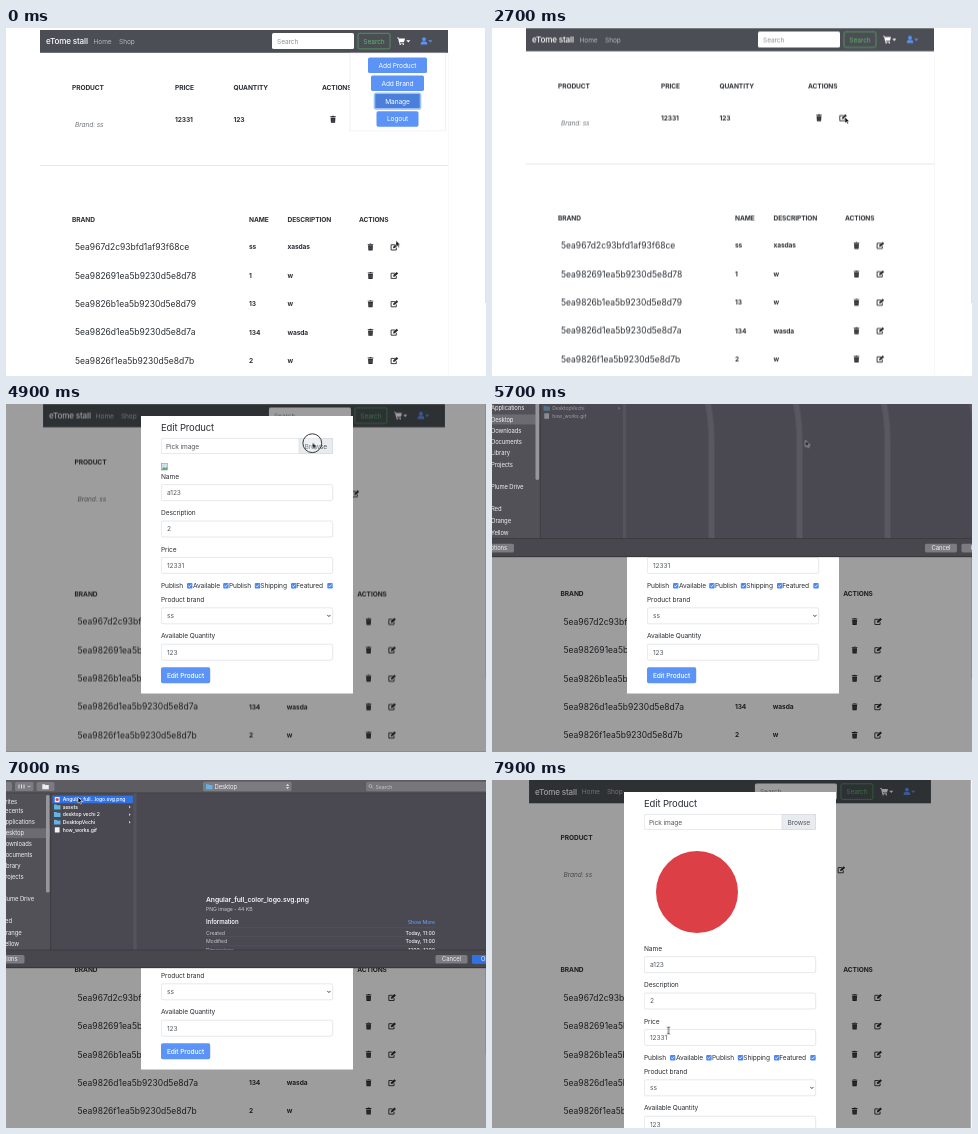
Recreate the animation shown at these times as an HTML page. Size 480 px wide and 348 px high, loop 8000 ms.

```html
<!DOCTYPE html>
<html lang="en">
<head>
<meta charset="utf-8">
<title>Book store admin</title>
<style>
html, body { margin: 0; width: 100%; height: 100%; overflow: hidden; background: #fff; }
svg { display: block; width: 480px; height: 348px; }
text { font: 400 6.6px Inter, "Open Sans", sans-serif; letter-spacing: -.015em; fill: #2b2f34; white-space: pre; }
.b { font-weight: 700; }
.m { font-weight: 500; }
.id { font-size: 8.5px; letter-spacing: 0; }
.h { font-size: 9.5px; }
.brand { font-size: 8.1px; font-weight: 500; letter-spacing: -.02em; fill: #fff; }
.nav { fill: #b4b7ba; }
.hint { fill: #8a9097; }
.val { fill: #50565d; }
.it { font-style: italic; fill: #71777d; }
.w { fill: #fff; }
.mid { text-anchor: middle; }
.end { text-anchor: end; }
.side { font-size: 5.9px; fill: #f0eff3; }
.file { font-size: 5.05px; font-weight: 500; fill: #fff; }
.info { font-size: 5.2px; fill: #c9c8ce; }
.value { fill: #f0eff3; font-weight: 500; }
.link { fill: #5b9bf8; font-weight: 500; }
.f7 { font-size: 6.8px; font-weight: 600; fill: #f6f5f9; }
.f6 { font-size: 6px; font-weight: 600; fill: #f6f5f9; }
#narrow .rule { display: none; }

/* every track lasts one 8 s loop: 1% = 80 ms */
#scroll, #menu, #wide, #narrow, #dim, #modal, #shift, #rest, #photo, #broken, #sheet,
#files, #stripes, #pick, #open, #mouse, #arrow, #beam, #ring { animation: 8s linear infinite; }
#wide, #narrow, #menu, #shift, #rest, #photo, #broken, #files, #stripes, #pick, #open,
#arrow, #beam, #ring { animation-timing-function: step-end; }

#scroll { animation-name: scroll; }
@keyframes scroll { 0%, 1.25% { transform: translateY(1.5px); animation-timing-function: ease-out; } 6%, 100% { transform: none; } }
#menu { animation-name: menu; }
@keyframes menu { 0% { opacity: 1; } 24%, 100% { opacity: 0; } }
#wide { animation-name: before; }
@keyframes before { 0% { opacity: 1; } 35%, 100% { opacity: 0; } }
#narrow { animation-name: after; }
@keyframes after { 0% { opacity: 0; } 35%, 100% { opacity: 1; } }
#dim { animation-name: dim; }
@keyframes dim { 0%, 34.5% { opacity: 0; } 37.5%, 100% { opacity: .385; } }
#modal { animation-name: modal; }
@keyframes modal {
  0%, 35% { opacity: 0; transform: translateY(-21px); animation-timing-function: ease-out; }
  39%, 100% { opacity: 1; transform: none; }
}
#shift { animation-name: shift; }
@keyframes shift { 0% { transform: none; } 97.5%, 100% { transform: translateX(-3px); } }
#rest { animation-name: rest; }
@keyframes rest { 0% { transform: none; } 97.5%, 100% { transform: translateY(96px); } }
#photo { animation-name: photo; }
@keyframes photo { 0% { opacity: 0; } 97.5%, 100% { opacity: 1; } }
#broken { animation-name: broken; }
@keyframes broken { 0% { opacity: 1; } 97.5%, 100% { opacity: 0; } }
#sheet { animation-name: sheet; }
@keyframes sheet {
  0%, 66.8% { transform: translate(3.5px, -200px) scale(1, 1.02); }
  71.25% { transform: translate(3.5px, -39px) scale(1, 1.02); animation-timing-function: ease-out; }
  75%, 91.5% { transform: translate(0, 0) scale(1, 1); animation-timing-function: ease-in; }
  96%, 100% { transform: translate(0, -200px) scale(1, 1); }
}
#files { animation-name: files; }
@keyframes files { 0% { opacity: .4; } 75%, 100% { opacity: 1; } }
#stripes { animation-name: stripes; }
@keyframes stripes { 0% { opacity: 1; } 76%, 100% { opacity: 0; } }
#pick, #open { animation-name: pick; }
@keyframes pick { 0% { opacity: 0; } 86.25%, 100% { opacity: 1; } }
#mouse { animation-name: mouse; }
@keyframes mouse {
  0%, 1.25% { transform: translate(390px, 212.5px); }
  11.25% { transform: translate(384px, 84px); }
  12.5% { transform: translate(410px, 38px); }
  13.75%, 15% { transform: translate(404px, 63px); }
  17.4%, 21.25% { transform: translate(392px, 149.5px); }
  31.25%, 43.75% { transform: translate(353px, 89px); }
  53.75% { transform: translate(312px, 58px); }
  56.25%, 67.5% { transform: translate(306.5px, 38.5px); }
  70%, 71.5% { transform: translate(313.5px, 36.5px); }
  77.5%, 78.75% { transform: translate(115px, 45px); }
  83.75%, 91.25% { transform: translate(72px, 17px); }
  97%, 100% { transform: translate(176.5px, 247px); }
}
#arrow { animation-name: arrow; }
@keyframes arrow { 0% { opacity: 1; } 96.25%, 100% { opacity: 0; } }
#beam { animation-name: beam; }
@keyframes beam { 0% { opacity: 0; } 96.25%, 100% { opacity: 1; } }
#ring { animation-name: ring; }
@keyframes ring { 0% { opacity: 0; } 58.75% { opacity: 1; } 63.75%, 100% { opacity: 0; } }
</style>
</head>
<body>
<svg id="stage" viewBox="0 0 480 348" xmlns="http://www.w3.org/2000/svg"></svg>
<script>
const BLUE = '#5b93f7', LINE = '#d3d7dc', RED = '#dc3f45', BAR = '#48474d', KEY = '#7c7b81';
const rect = (x, y, w, h, fill, extra = '') =>
  `<rect x="${x}" y="${y}" width="${w}" height="${h}" fill="${fill}" ${extra}/>`;
const text = (x, y, s, cls = '') => `<text x="${x}" y="${y}" class="${cls}">${s}</text>`;
const path = (d, fill, extra = '') => `<path d="${d}" fill="${fill}" ${extra}/>`;
const line = (d, color, width) => path(d, 'none', `stroke="${color}" stroke-width="${width}"`);
const disc = (x, y, r, fill) => `<circle cx="${x}" cy="${y}" r="${r}" fill="${fill}"/>`;
const at = (x, y, s) => `<g transform="translate(${x} ${y})">${s}</g>`;
const group = (id, ...s) => `<g id="${id}">${s.join('')}</g>`;
const range = (list, fn) => list.map(fn).join('');

// icons, centred on 0,0
const trash = (x, y) => at(x, y,
  path('M-2.8 -3H-1L-.6 -3.5H.6L1 -3H2.8V-2.2H-2.8ZM-2.4 -1.7H2.4L2.1 3.5H-2.1Z', '#25292d') +
  line('M-1 -.8V2.6M0 -.8V2.6M1 -.8V2.6', '#777', .35));
const edit = (x, y) => at(x, y,
  line('M.6 -2.2H-3.2V3H2V.6', '#25292d', .9) +
  path('M-1.2 1.3L-.9 -.4L2.3 -3.5L3.9 -2L.6 1Z', '#25292d'));
const caret = (x, y, fill) => path(`M${x} ${y}h4l-2 2.2z`, fill);
const cart = (x, y) => at(x, y,
  path('M-4 -3.5H-2.4L-2.1 -2.5H4L3.1 1H-1.2L-1 1.7H2.9V2.4H-1.7L-2.9 -2.8H-4Z', '#fff') +
  disc(-.8, 3.2, .8, '#fff') + disc(2.3, 3.2, .8, '#fff'));
const user = (x, y) => at(x, y,
  disc(0, -1.8, 1.9, BLUE) + path('M-3.2 3.5V2Q-3 .4 -1.4 .4H1.4Q3 .4 3.2 2V3.5Z', BLUE));

const brands = [
  ['5ea967d2c93bfd1af93f68ce', 'ss', 'xasdas'],
  ['5ea982691ea5b9230d5e8d78', '1', 'w'],
  ['5ea9826b1ea5b9230d5e8d79', '13', 'w'],
  ['5ea9826d1ea5b9230d5e8d7a', '134', 'wasda'],
  ['5ea9826f1ea5b9230d5e8d7b', '2', 'w'],
];

// k narrows the layout around its middle without scaling the type
function page(k) {
  const X = x => +(238 + (x - 238) * k).toFixed(2);
  const t = (x, y, s, cls) => text(X(x), y, s, cls);
  const left = X(34), right = X(442), width = right - left;
  return [
    rect(left, 0, width, 23.3, '#4b4f55'),
    t(40, 14.7, 'eTome stall', 'brand'), t(87.5, 14.2, 'Home', 'nav'), t(113, 14.2, 'Shop', 'nav'),
    at(right - 442, 0,
      rect(266, 3.6, 82, 16, '#fff', 'rx="1.7"') + text(271, 14, 'Search', 'hint') +
      rect(352, 3.8, 32, 15.6, 'none', 'rx="1.7" stroke="#57ab62" stroke-width=".7"') +
      '<text x="368" y="14" class="mid" style="fill:#5db569">Search</text>' +
      cart(395, 11.5) + caret(400.3, 10.8, '#fff') + user(418, 11.5) + caret(422.3, 10.8, BLUE)),
    t(66, 60, 'PRODUCT', 'b'), t(169, 60, 'PRICE', 'b'), t(227.5, 60, 'QUANTITY', 'b'), t(316, 60, 'ACTIONS', 'b'),
    t(69, 97, 'Brand: ss', 'it'), t(169, 92.2, '12331', 'b'), t(227.5, 92.2, '123', 'b'),
    trash(X(327), 89.8), edit(X(351), 89.8),
    rect(left, 135.6, width, .7, '#dedede', 'class="rule"'),
    rect(right, 23, .5, 325, '#f0f0f0', 'class="rule"'),
    t(66, 192.3, 'BRAND', 'b'), t(243, 192.3, 'NAME', 'b'), t(281.5, 192.3, 'DESCRIPTION', 'b'), t(353, 192.3, 'ACTIONS', 'b'),
    range(brands, ([id, name, about], i) => {
      const y = 217.5 + 28.4 * i;
      return t(69, y + 3.2, id, 'id') + t(243, y + 2.3, name, 'b') + t(281.5, y + 2.3, about, 'b') +
        trash(X(364.5), y) + edit(X(388.3), y);
    }),
  ].join('');
}

const menu = rect(344, 23.5, 95.5, 78, '#fff', 'stroke="#ececec" stroke-width=".7"') +
  range([['Add Product', 59], ['Add Brand', 53], ['Manage', 46], ['Logout', 42]], ([s, w], i) => {
    const y = 28 + 17.9 * i, on = s === 'Manage';
    return rect(391.5 - w / 2, y, w, 15.6, on ? '#4a7fda' : BLUE,
      'rx="1.7"' + (on ? ' stroke="#9dbff8" stroke-width="1.6"' : '')) + text(391.5, y + 10.2, s, 'mid w');
  });

const field = (y, s) => rect(155.3, y, 171.4, 16, '#fff', `rx="1.7" stroke="${LINE}" stroke-width=".6"`) +
  text(161, y + 10.4, s, 'val');
const check = x => rect(x, 179, 5.4, 5.4, '#4c88ee', 'rx=".9"') + line(`M${x + 1.2} 181.8l1.1 1.1l1.9 -2.3`, '#fff', .8);

const form = [
  text(155, 74.7, 'Name'), field(80.6, 'a123'),
  text(155, 111, 'Description'), field(117, '2'),
  text(155, 147.7, 'Price'), field(153.4, '12331'),
  range([[155, 'Publish', 181], [187, 'Available', 217.2], [223, 'Publish', 248.8], [254.3, 'Shipping', 285], [290.3, 'Featured', 321.3]],
    ([x, s, box]) => text(x, 184, s) + check(box)),
  text(155, 197.7, 'Product brand'), field(203.8, 'ss'),
  line('M321.3 210.9l1.6 1.7l1.6 -1.7', '#333', .9),
  text(155, 234.3, 'Available Quantity'), field(240.2, '123'),
  rect(155, 263.2, 49.2, 16, BLUE, 'rx="1.7"'), text(179.6, 273.8, 'Edit Product', 'mid w m'),
].join('');

const modal = group('shift',
  rect(135, 12, 212, 277.5, '#fff'),
  group('photo', rect(135, 12, 212, 400, '#fff'), rect(481.8, 0, 2, 348, '#fafafa'), disc(208, 112, 41, RED)),
  text(155, 26.7, 'Edit Product', 'h'),
  rect(155.3, 34.4, 171.4, 15.2, '#fff', `rx="1.7" stroke="${LINE}" stroke-width=".6"`),
  text(160, 44.5, 'Pick image', 'val'),
  rect(293, 34.4, 33.7, 15.2, '#e9ecef', `stroke="${LINE}" stroke-width=".6"`),
  text(309.8, 44.5, 'Browse', 'mid val'),
  group('broken', rect(155.3, 59.6, 6, 6.4, '#cfe0f5', 'stroke="#8b95a3" stroke-width=".6"'),
    path('M155.6 65.7l2.2 -2.8l1.4 1.4l1.9 -1.4v2.8z', '#63a05c')),
  group('rest', form));

const folder = (x, y, fill) => path(`M${x} ${y - 2.5}h2.4l.7 .7h3.4v4.2h-6.5z`, fill);
const doc = y => rect(48.8, y - 2.6, 4.8, 5.4, '#f1f1f1', 'rx=".5"');
const key = (x, y, w, h, fill = KEY) => rect(x, y, w, h, fill, 'rx="1.6"');

const files = group('files',
  doc(19.5), disc(51.2, 19.6, 1.5, RED), text(56.7, 21.3, 'Angular_full...logo.svg.png', 'file'),
  range([[27, 'assets'], [34.6, 'desktop vechi 2'], [42.2, 'DesktopVechi']], ([y, s]) =>
    folder(48, y, '#62b4e4') + text(56.7, y + 1.8, s, 'file') + path(`M123 ${y - 1.4}l1.7 1.4l-1.7 1.4z`, '#d0cfd5')),
  doc(49.8), text(56.7, 51.6, 'how_works.gif', 'file'));

const places = [[23.7, 'Favourites', -17], [33, 'Recents'], [44.4, 'Applications'], [55.4, 'Desktop'], [66.4, 'Downloads'],
  [77.4, 'Documents'], [88.4, 'Library'], [99.4, 'Projects'], [121.4, 'Plume Drive'], [143.4, 'Red'], [155, 'Orange'], [166.2, 'Yellow']];
const details = [['Created', 'Today, 11:00'], ['Modified', 'Today, 11:00'], ['Dimensions', '1200×1200']];
const preview = group('pick',
  rect(46.5, 15.6, 80.5, 7.7, '#3271e2'),
  text(200, 122.3, 'Angular_full_color_logo.svg.png', 'f7'),
  text(200, 130.6, 'PNG image - 44 KB', 'info'),
  text(200, 144.2, 'Information', 'f6'), text(429, 143.8, 'Show More', 'info link end'),
  rect(200, 147.7, 229, .4, '#626068'),
  range(details, ([a, b], i) => {
    const y = 154.8 + 8.5 * i;
    return text(200, y, a, 'info') + text(429, y, b, 'info value end') + rect(200, y + 1.8, 229, .4, '#5c5a62');
  }));

const toolbar = [
  rect(-10, 0, 500, 13, '#5d5c61'), rect(-10, 12.6, 500, .6, '#38373d'),
  key(-6, 2, 12, 9), key(9, 2, 18.5, 9), key(30.5, 2, 18, 9),
  line('M13 4.5v4M15.5 4.5v4M18 4.5v4', '#eee', .9), line('M21.7 5.8l1.3 1.4l1.3 -1.4', '#eee', .7),
  folder(36.3, 6.8, '#eee'),
  key(197, 1.7, 88.5, 9.6), folder(200, 6.8, '#62b4e4'), text(208.5, 9, 'Desktop', 'side'),
  path('M280 5.7l1.6 -1.8l1.6 1.8zM280 7.3l1.6 1.8l1.6 -1.8z', '#f0f0f0'),
  key(360, 1.8, 130, 9.4, '#77767b'),
  '<circle cx="364.4" cy="6" r="1.5" fill="none" stroke="#ccc" stroke-width=".6"/>',
  line('M365.5 7.1l1.4 1.5', '#ccc', .6), text(369.5, 8.7, 'Search', 'info'),
].join('');

const footer = [
  rect(-10, 170, 500, 18, BAR), rect(-10, 169.7, 500, .6, '#35343a'), rect(-10, 187.3, 500, .7, '#333238'),
  key(-16, 175, 34.5, 8.6), text(11.5, 181.3, 'Options', 'side end'),
  key(429.5, 175, 32, 8.6), text(445.5, 181.4, 'Cancel', 'side mid'),
  key(466, 175, 34, 8.6),
  group('open', key(466, 175, 34, 8.6, '#3271e2')), text(475, 181.4, 'Open', 'side'),
].join('');

const sheet = [
  rect(-10, 188, 500, 1, '#000', 'opacity=".12"'),
  rect(-10, 0, 500, 188, '#4a4850'),
  rect(-10, 13, 55, 157, '#525158'),
  rect(-10, 48.3, 54, 9.8, '#6c6b72'),
  range(places, ([y, s, x = -4.5]) => text(x, y, s, 'side')),
  rect(44.3, 13, .8, 157, '#38373d'),
  key(40, 15, 3.6, 97.5, '#97969b'),
  group('stripes', range([1, 2, 3, 4], i => {
    const x = 128 + 88 * i;
    return line(`M${x - 12} 12Q${x} 36 ${x} 76V170`, '#59575f', 6);
  })),
  rect(127.3, 13, 3.4, 157, '#55535b'),
  preview, files, footer, toolbar,
].join('');

const mouse = group('arrow', path('M0 0V6.2L1.5 4.9L2.5 7.1L3.5 6.7L2.5 4.5H4.4Z', '#0b0b0b', 'stroke="#fff" stroke-width=".5"')) +
  group('beam', line('M-1.4 0Q0 0 0 1V6Q0 7 -1.4 7M1.4 0Q0 0 0 1M0 6Q0 7 1.4 7', '#222', .8));

document.getElementById('stage').innerHTML = [
  rect(0, 0, 480, 348, '#fff'),
  group('scroll', group('wide', page(1)), group('narrow', rect(0, 0, 480, 348, '#fff'), page(.985)), group('menu', menu)),
  rect(479, 0, 1, 275, '#e4e4e4'),
  group('dim', rect(0, 0, 480, 348, '#000')),
  group('modal', modal),
  group('sheet', sheet),
  group('ring', '<circle cx="306.3" cy="39.2" r="9.4" fill="#fff" fill-opacity=".25" stroke="#222" stroke-width=".9"/>'),
  group('mouse', mouse),
].join('');
</script>
</body>
</html>
```
